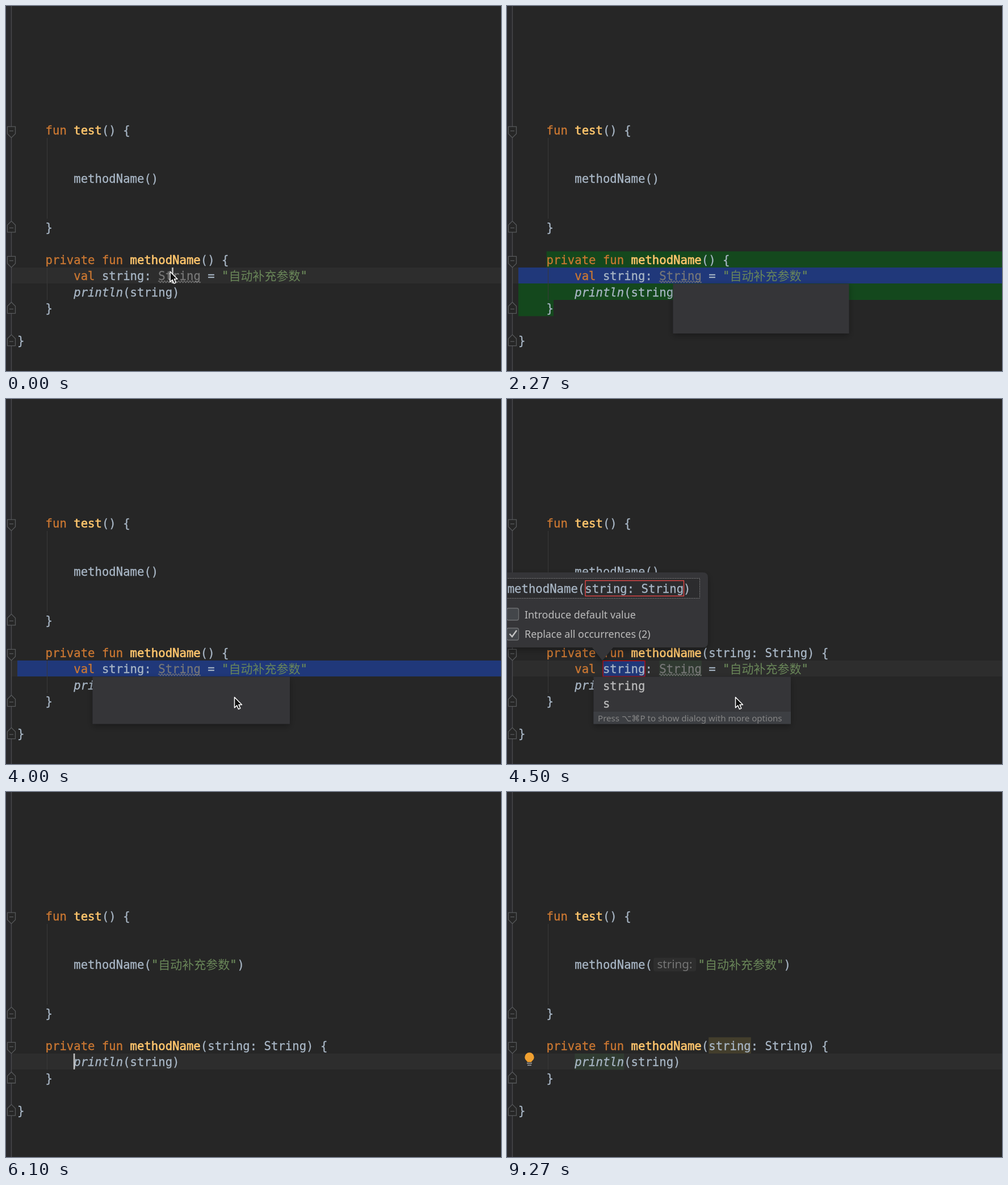
Animation, 872 px wide and 642 px high, one loop 9310 ms. Source, as an HTML page:

```html
<!DOCTYPE html>
<html lang="en">
<head>
<meta charset="utf-8">
<title>Introduce parameter</title>
<style>
html, body { margin: 0; width: 100%; height: 100%; overflow: hidden; background: #262626; }
svg { display: block; }
text { white-space: pre; fill: currentColor; }
.code { font: 20.63px "DejaVu Sans Mono", monospace; color: #a9b7c6; stroke: currentColor; stroke-width: .3px; }
.ui { font: 17.9px "Noto Sans", sans-serif; color: #bdbdbd; }
.kw { color: #cc7832; }
.fn { color: #ffc66d; stroke-width: .6px; }
.str { color: #6a8759; }
.han { color: #6a8759; font: 21px "Noto Sans CJK SC", "Noto Sans CJK", sans-serif; }
.dim { color: #777; }
.item { color: #bbb; }
.it { font-style: italic; }
</style>
</head>
<body>
<svg id="stage" width="872" height="642" viewBox="0 0 872 642"></svg>
<script>
const LOOP = 9310, ROW = 28.53, TOP = 203.2, CHAR = 12.42, LEFT = 19.9;
const rowY = row => TOP + row * ROW;
const colX = col => LEFT + col * CHAR;

// Moments of the story, in ms
const T = {
  hints: 600, select: 2200, chooser: 2230, chooserReady: 2300,
  picked: 3850, list: 3980, template: 4040, balloon: 4130,
  accepted: 5850, settled: 6300, bulb: 7900
};

const during = (from, to, ...parts) => `<g data-from="${from}" data-to="${to}">${parts.join('')}</g>`;
const rect = (x, y, w, h, fill, extra = '') =>
  `<rect x="${x}" y="${y}" width="${w}" height="${h}" fill="${fill}" ${extra}/>`;
const path = (d, fill, stroke = 'none', extra = '') =>
  `<path d="${d}" fill="${fill}" stroke="${stroke}" ${extra}/>`;
const text = (x, y, str, cls, extra = '') => `<text x="${x}" y="${y}" class="${cls}" ${extra}>${str}</text>`;
const cells = (row, col, count, fill) =>
  rect(colX(col), rowY(row), count * CHAR, ROW, fill);

// Code line made of [column, text, style] pieces
const line = (row, ...pieces) => pieces.map(([col, str, cls = '']) =>
  text(colX(col), rowY(row) + 22.4, str, 'code ' + cls)).join('');

const quoted = (row, x) => {
  const y = rowY(row) + 22.4;
  return text(x, y, '"', 'code str') + text(x + CHAR, y, '自动补充参数', 'han') +
    text(x + CHAR + 126, y, '"', 'code str');
};

const guide = (y1, y2) => path(`M72.5 ${y1}V${y2}`, 'none', '#393939');

const fold = (row, closing) => {
  const y = rowY(row) + (closing ? 15 : 17.5), s = closing ? -1 : 1;
  return path(`M2.5 ${y - 8.5 * s}H16.5V${y + 4 * s}L9.5 ${y + 11 * s}L2.5 ${y + 4 * s}Z`,
    '#262626', '#57595b', 'stroke-width="1.3"') + path(`M6 ${y - s}H13`, 'none', '#57595b', 'stroke-width="1.3"');
};

const wave = path(`M${colX(20)} 485` + 'q1.24 -3.4 2.48 0q1.24 3.4 2.48 0'.repeat(15),
  'none', '#777', 'stroke-width="1.2"');

const bulb = path('M36 475C35.500 473 31.300 471 31.300 466.500A8.200 8.200 0 0 1 47.700 466.500C47.700 471 43.500 473 43 475Z', '#f0a030') +
  path('M35 477H44M36 480.500H43', 'none', '#a8a8a8', 'stroke-width="1.7"');

const folder = y => path(`M571 ${y - 9}H579L582 ${y - 6}H593V${y + 8}H571Z`, '#868b91') +
  rect(583, y + 1, 12, 12, '#343538') + rect(584.5, y + 2.5, 10, 10, '#40b6e0');

const badge = (y, letter, fill) => `<circle cx="316" cy="${y}" r="10.5" fill="${fill}"/>` +
  text(316, y + 5, letter, 'ui', 'text-anchor="middle" style="font-size:15px;color:#2b2b2b"');

const checkbox = y => rect(-.5, y, 21, 21, '#43464a', 'rx="3" stroke="#6d6f71" stroke-width="1.3"');

const signature = params => line(8, [4, 'private fun', 'kw'], [16, 'methodName', 'fn'], [26, `(${params}) {`]);
const printCall = row => line(row, [8, 'println', 'it'], [15, '(string)']);

const selectionLayer = [
  rect(0, 0, 9, 642, '#2a2a2d'),
  rect(10, rowY(9), 862, ROW - .5, '#2d2d2d'),
  during(T.hints, T.accepted, cells(9, 20, 6, '#303a31')),
  during(T.chooser, T.picked,
    path(`M${colX(4)} ${rowY(8)}H872V${rowY(11)}H${colX(5)}V${rowY(12)}H20V${rowY(9)}H${colX(4)}Z`, '#14481d')),
  during(T.select, T.template, rect(20, rowY(9), 852, ROW - .5, '#20387a')),
  during(T.template, T.accepted, rect(169, 460.5, 74, 27.5, '#20387a', 'stroke="#e80000"')),
  during(T.settled, LOOP, cells(8, 27, 6, '#433e2c')),
  during(T.bulb, LOOP, cells(9, 8, 7, '#303b31'))
];

const codeLayer = [
  path('M9.5 0V642', 'none', '#4b4c4f', 'stroke-width="1.3"'),
  guide(232, 374),
  fold(0), fold(6, true), fold(8),
  line(0, [4, 'fun', 'kw'], [8, 'test', 'fn'], [12, '() {']),
  line(6, [4, '}']),
  during(0, T.template, signature('')),
  during(T.template, LOOP, signature('string: String')),
  during(0, T.accepted,
    line(3, [8, 'methodName()']),
    guide(rowY(9), rowY(11)), fold(11, true), fold(13, true),
    line(9, [8, 'val', 'kw'], [12, 'string:'], [20, 'String', 'dim'], [27, '=']),
    quoted(9, colX(29)), wave, printCall(10), line(11, [4, '}']), line(13, [0, '}'])),
  during(T.accepted, LOOP,
    guide(rowY(9), rowY(10)), fold(10, true), fold(12, true),
    line(3, [8, 'methodName(']), printCall(9), line(10, [4, '}']), line(12, [0, '}'])),
  during(T.accepted, T.settled, quoted(3, colX(19)), line(3, [31.2, ')'])),
  during(T.settled, LOOP,
    rect(258, 291.5, 75, 24, '#2e2e2e', 'rx="4"'),
    text(264.5, 310, 'string:', 'ui', 'style="font-size:20.6px;color:#757575"'),
    quoted(3, 336.6), text(487.4, rowY(3) + 22.4, ')', 'code')),
  during(T.hints, T.select, bulb),
  during(T.bulb, LOOP, bulb),
  `<rect id="caret" y="${rowY(9)}" width="2.6" height="28" fill="#c0c0c0"/>`
];

const chooser = during(T.chooser, T.picked,
  rect(292.5, 488.5, 310, 87.5, '#343538', 'filter="url(#shadow)"'),
  during(T.chooserReady, T.picked,
    rect(292.5, 488.5, 310, 27.5, '#3a3b3e'),
    text(299, 508, 'Introduce parameter to declaration', 'ui'),
    rect(292.5, 516, 310, 29.5, '#2659c4'),
    badge(531, 'm', '#b0719c'),
    text(334, 537, 'methodName()', 'ui', 'style="color:#fff"'),
    text(532, 537.5, 'app', 'ui', 'style="color:#fff"'), folder(530),
    badge(560.5, 'C', '#3d8ba2'), rect(317, 562, 11, 11, '#e8863c'),
    text(334, 566.5, 'MainActivity', 'ui'),
    text(532, 567.5, 'app', 'ui dim'), folder(560)));

const nameList = during(T.list, T.accepted,
  rect(152.5, 488.5, 347.5, 83, '#343538', 'filter="url(#shadow)"'),
  during(T.template, T.accepted,
    text(colX(12), 512, 'string', 'code item'),
    text(colX(12), 543, 's', 'code item'),
    rect(152.5, 550, 347.5, 21.5, '#3d3f43'),
    text(160, 566.5, 'Press ⌥⌘P to show dialog with more options', 'ui',
      'style="font:15.1px \'Noto Sans\',\'DejaVu Sans\',sans-serif;color:#858585"')));

const balloon = during(T.balloon, T.accepted,
  path('M-20 305H345Q354 305 354 314V428Q354 437 345 437H187L168 460L150 437H-20Z', '#343538', 'none', 'filter="url(#shadow)"'),
  rect(-10, 315.5, 349.5, 35, '#2c2c2e', 'stroke="#8a8a8a" stroke-dasharray="1.5 1.5"'),
  text(.7, 341, 'methodName(string: String)', 'code'),
  rect(138, 319.5, 173.5, 27, 'none', 'stroke="#f04a4a" stroke-width="1.3"'),
  checkbox(368), checkbox(403),
  path('M4.500 413L9 418L17 407', 'none', '#c4c4c4', 'stroke-width="2.4"'),
  text(31, 385.5, 'Introduce default value', 'ui'),
  text(31, 420, 'Replace all occurrences (2)', 'ui'));

const pointer = `<g id="mouse">
  ${path('M0 0V18.500L4.200 14.600L7 21L10.300 19.600L7.500 13.300H13Z', '#111', '#fff', 'id="arrow" stroke-width="1.5" stroke-linejoin="round"')}
  ${path('M-2 1.500Q-1 -1 1.500 1L4 7L5 6Q7 5 8 7Q10 5.500 11 8Q13 8 13 11V15L11 19H1L-5 12Q-6 9 -3 9.500L0 11.500Z', '#fff', '#111',
    'id="hand" stroke-width="1.3" stroke-linejoin="round"')}
</g>`;

const stage = document.getElementById('stage');
stage.innerHTML = `<defs><filter id="shadow" x="-20%" y="-30%" width="140%" height="170%">
  <feDropShadow dx="0" dy="4" stdDeviation="6" flood-color="#000" flood-opacity=".32"/></filter></defs>
  ${rect(0, 0, 872, 642, '#262626')}` +
  [...selectionLayer, ...codeLayer, chooser, nameList, balloon, pointer].join('');

const timed = [...stage.querySelectorAll('[data-from]')].map(node =>
  ({ node, from: +node.dataset.from, to: +node.dataset.to }));
const [caret, mouse, arrow, hand] = ['caret', 'mouse', 'arrow', 'hand'].map(id => document.getElementById(id));
const show = (node, on) => node.setAttribute('display', on ? 'inline' : 'none');

// Mouse stops: [time, x, y]
const stops = [[0, 289, 467], [2500, 289, 467], [3150, 412, 523], [3850, 412, 523],
  [3960, 402.5, 524.5], [4770, 402.5, 524.5], [5250, 250.5, 490], [LOOP, 250.5, 490]];

function mouseAt(t) {
  const i = stops.findIndex(stop => stop[0] > t);
  const [t0, x0, y0] = stops[i - 1], [t1, x1, y1] = stops[i];
  const p = (t - t0) / (t1 - t0), ease = p * p * (3 - 2 * p);
  return [x0 + (x1 - x0) * ease, y0 + (y1 - y0) * ease];
}

function render(t) {
  for (const { node, from, to } of timed) show(node, t >= from && t < to);

  const blinkStart = t < T.select ? 0 : T.settled;
  const blinkOn = Math.floor((t - blinkStart) / 500) % 2 === 0;
  show(caret, (t < T.select || t >= T.accepted) && (blinkOn || (t >= T.accepted && t < T.settled)));
  caret.setAttribute('x', t < T.select ? 292.2 : 118.8);

  const [x, y] = mouseAt(t);
  const overItem = t >= T.chooserReady && t < T.picked && y > 500;
  show(mouse, t < T.select || (t >= 2500 && t < T.accepted));
  show(arrow, !overItem);
  show(hand, overItem);
  mouse.setAttribute('transform', `translate(${x} ${y})`);
}

const start = performance.now();
function tick() {
  render((performance.now() - start) % LOOP);
  requestAnimationFrame(tick);
}
render(0);
tick();
</script>
</body>
</html>
```
